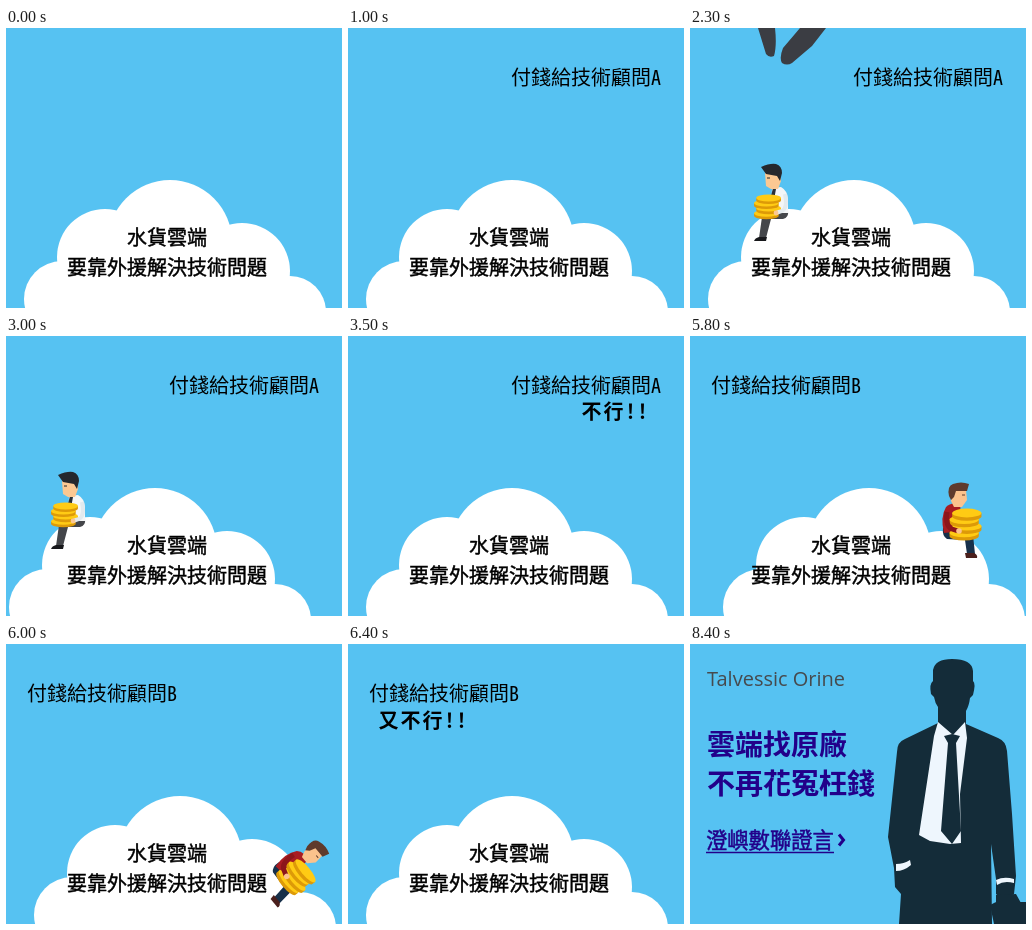
Recreate the animation shown at these times as an HTML page. Size 336 by 280 pixels, loop 9.4 s.

```html
<!DOCTYPE html>
<html lang="zh-Hant">
<head>
<meta charset="utf-8">
<style>
html, body { margin: 0; width: 100%; height: 100%; overflow: hidden; background: #56c2f2; }
svg { display: block; width: 336px; height: 280px; }
text { font-family: "Noto Sans Mono CJK TC", "Noto Sans CJK TC", "Noto Sans CJK", sans-serif; font-size: 20px; fill: #000; }
.cloud-text { font-family: "Noto Sans CJK TC", "Noto Sans CJK", sans-serif; stroke: #000; stroke-width: .45px; }
.fail { font-weight: 700; letter-spacing: 2px; }
.brand { font: 400 20px "Open Sans", "Noto Sans", sans-serif; fill: #464a4e; }
.title { font: 700 28px "Noto Sans CJK TC", "Noto Sans CJK", sans-serif; fill: #22008a; }
.link { font: 400 21.3px "Noto Sans CJK TC", "Noto Sans CJK", sans-serif; fill: #22008a; stroke: #22008a; stroke-width: .5px; }
</style>
</head>
<body>
<svg viewBox="0 0 336 280">
  <defs>
    <g id="coins"></g>
    <g id="hand" fill="#3b3d43">
      <path d="M68 0L76 26Q79 30 84 28Q87 18 85 0L100-24 78-22Z"/>
      <path d="M110 0L93 20Q89 30 92 35Q97 38 102 35L122 18 136 0 150-24 110-40 84-22 98-12Z"/>
      <path d="M84-22L112-52 250-130 334-100 148-20 110-2Z"/>
    </g>
  </defs>
  <rect width="336" height="280" fill="#56c2f2"/>

  <g id="story">
    <g id="cloud" fill="#fff">
      <circle cx="164" cy="214" r="62"/>
      <circle cx="99" cy="229" r="48"/>
      <circle cx="236" cy="243" r="48"/>
      <circle cx="56" cy="271" r="38"/>
      <circle cx="284" cy="284" r="36"/>
      <path d="M56 250H99V215H236V250H284V280H56Z"/>
    </g>

    <g id="manA">
      <path d="M98 182Q99 190 93 191L81 191 76 210H69L72 189Q74 184 80 184Z" fill="#44464a"/>
      <path d="M69 209H77L76 213H64Q65 210 69 209Z" fill="#17181b"/>
      <path d="M82 160L91 159Q97 162 98 171L98 185H81Z" fill="#f4f6f7"/>
      <path d="M83 160L86 161 84 172 81 168Z" fill="#2a3038"/>
      <path d="M75 145H90L91 153 88 161H81L76 158Z" fill="#fbc892"/>
      <path d="M71 139Q80 135 86 136Q92 138 92 145L90 153 87 148 76 146Z" fill="#25282d"/>
      <path d="M77 150H80" stroke="#25282d"/>
      <use href="#coins" transform="translate(77.5 170) scale(1.12 .85)"/>
      <path d="M95 166Q98 180 92 183L86 185" fill="none" stroke="#e3eaee" stroke-width="4"/>
      <circle cx="86" cy="185" r="2.4" fill="#fbc892"/>
    </g>

    <g id="manB">
      <path d="M238 192L257 191 268 199 270 218H262L260 204 242 203Q237 200 238 192Z" fill="#17304a"/>
      <path d="M260 217H269Q273 219 272 222H261Z" fill="#4a1f1c"/>
      <path d="M241 171Q247 165 255 169L258 195 239 197Q235 181 241 171Z" fill="#a81c22"/>
      <path d="M247 154H261L262 164 257 171H249L246 165Z" fill="#fbc28c"/>
      <path d="M244 160Q242 150 248 148Q256 145 264 148L262 155 251 155 249 161 246 164Z" fill="#5f3a2c"/>
      <path d="M257 159H260" stroke="#5f3a2c"/>
      <use href="#coins" transform="translate(260.5 177) scale(1.33 1.1)"/>
      <path d="M242 176Q240 190 247 193L253 195" fill="none" stroke="#8c151b" stroke-width="5"/>
      <circle cx="254" cy="195" r="2.8" fill="#fbc28c"/>
    </g>

    <text class="cloud-text" x="121" y="216.5">水貨雲端</text>
    <text class="cloud-text" x="61" y="246.5">要靠外援解決技術問題</text>
    <text id="payA" x="163" y="57">付錢給技術顧問A</text>
    <text id="failA" class="fail" x="233.5" y="83">不行!!</text>
    <text id="payB" x="21" y="57">付錢給技術顧問B</text>
    <text id="failB" class="fail" x="30.5" y="83.5">又不行!!</text>
    <use id="handA" href="#hand"/>
    <use id="handB" href="#hand"/>
  </g>

  <g id="ending">
    <g fill="#142c39">
      <path d="M243 37V26Q245 15 262 15Q282 15 283 27V37Q286 39 283 51L280 54Q279 62 276 67V80L308 94Q316 97 317 107L322 170 326 232 324 250 313 256 306 250V235L301 200 302 280H209L211 250 205 243 204 224 198 193 207 108Q207 98 215 95L248 79V63Q245 59 244 53L241 50Q239 40 243 37Z"/>
      <path d="M300 261L306 258H336V280H304ZM306 259V251L326 250 331 259Z"/>
    </g>
    <path d="M248 78L244 92 229 191 240 197 260 200 271 199 270 150 277 94 275 78 263 91Z" fill="#eef6fd"/>
    <path d="M254 92L262 90 270 92 266 99 271 187 262 200 251 187 258 99Z" fill="#142c39"/>
    <path d="M206 220Q214 220 220 216L221 221Q214 227 206 227ZM306 236Q314 232 324 235V239Q314 236 307 241Z" fill="#eef6fd"/>
    <text class="brand" x="17" y="42">Talvessic Orine</text>
    <text class="title" x="17" y="110.5">雲端找原廠</text>
    <text class="title" x="17" y="149.5">不再花冤枉錢</text>
    <text class="link" x="16" y="204">澄嶼數聯證言</text>
    <path d="M16 208.5H144" stroke="#22008a" stroke-width="1.3"/>
    <path d="M149 190.5L153.5 196 149 201.5" fill="none" stroke="#22008a" stroke-width="3"/>
  </g>
</svg>
<script>
const LOOP = 9400;
const el = id => document.getElementById(id);
const show = (id, on) => { el(id).style.display = on ? "" : "none"; };

el("coins").innerHTML = [18, 12, 6, 0].map((y, i) => {
  const x = i % 2 ? 1 : -1;
  return `<g transform="translate(${x} ${y})">
    <path d="M-11 0V3A11 4 0 0 0 11 3V0Z" fill="#dd9a08"/>
    <ellipse rx="11" ry="4" fill="#ffcb14"/></g>`;
}).join("");

// Each row: time, hand drop (null = no hand), cloud x, man x, man y, man turn
const stepsA = [
  [2000, 30, 0, 0, -70, 0],
  [2100, 70, 0, 0, -30, 0],
  [2200, 100, 0, 0, 0, 0],
  [2300, 0, 0, 0, 0, 0],
  [2800, null, -5, -5, 0, 0],
  [2900, null, 5, 5, 0, 0],
  [3000, null, -15, -19, 0, 0],
  [3100, null, 5, -30, 22, -25],
  [3200, null, -5, -36, 58, -60],
  [3300, null, 3, -36, 96, -95],
  [3400, null, -2, -36, 140, -120]
];
const stepsB = [
  [5200, 0, 0, 0, -70, 0],
  [5300, 0, 0, 0, 0, 0],
  [5800, null, 15, 15, 0, 0],
  [5900, null, -5, 26, 16, 20],
  [6000, null, 10, 33, 44, 50],
  [6100, null, -4, 36, 78, 85],
  [6200, null, 5, 36, 112, 110],
  [6300, null, -2, 36, 150, 130]
];

function stepAt(steps, t, end) {
  return t < end ? steps.filter(s => s[0] <= t).pop() : undefined;
}

function poseMan(name, step, cx, cy, flip) {
  const man = "man" + name, hand = "hand" + name;
  show(man, step);
  show(hand, step && step[1] !== null);
  if (!step) return 0;
  const [, drop, cloudX, x, y, turn] = step;
  el(man).setAttribute("transform", `translate(${x} ${y}) rotate(${turn} ${cx} ${cy})`);
  el(hand).setAttribute("transform", `translate(${flip ? 336 : 0} ${drop || 0}) scale(${flip ? -1 : 1} 1)`);
  return cloudX;
}

function draw(t) {
  const ending = t >= 8400;
  show("story", !ending);
  show("ending", ending);
  const shake = poseMan("A", stepAt(stepsA, t, 3500), 81, 175, false)
    + poseMan("B", stepAt(stepsB, t, 6400), 258, 185, true);
  el("cloud").setAttribute("transform", `translate(${shake})`);
  show("payA", t >= 1000 && t < 5000);
  show("failA", t >= 3500 && t < 5000);
  show("payB", t >= 5000);
  show("failB", t >= 6400);
}

const start = performance.now();
function tick() {
  draw((performance.now() - start) % LOOP);
  requestAnimationFrame(tick);
}
tick();
</script>
</body>
</html>
```
